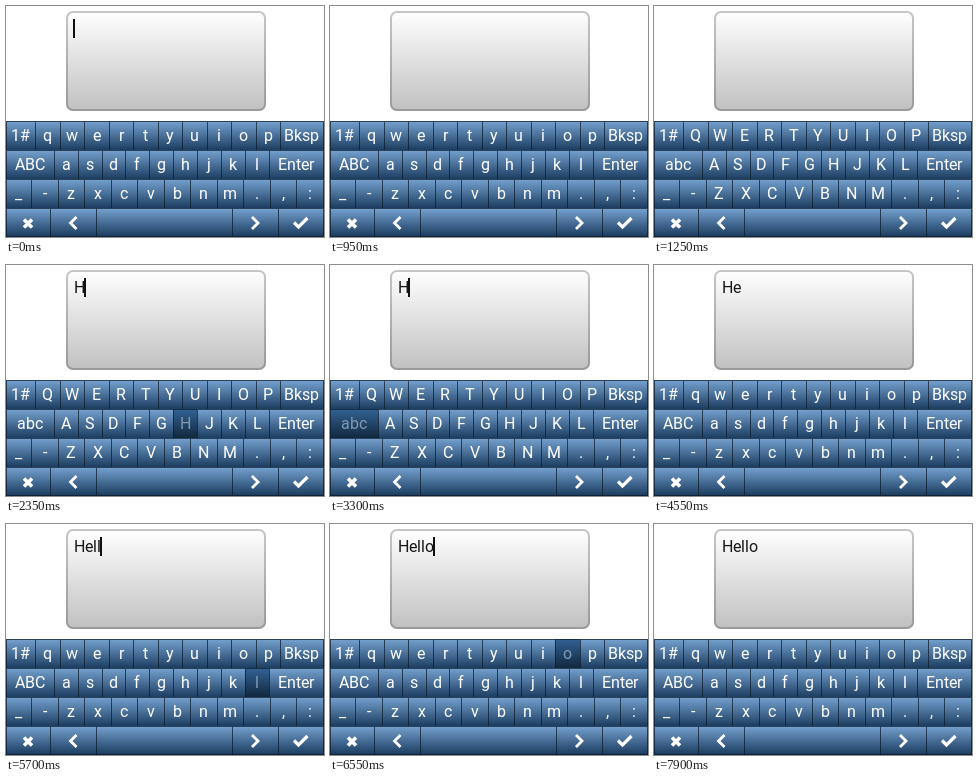
An HTML page that plays this animation: 318 px wide and 231 px high, repeating every 8000 ms.

```html
<!DOCTYPE html>
<html lang="en">
<head>
<meta charset="utf-8">
<title>On-screen keyboard</title>
<style>
  html, body { margin: 0; width: 100%; height: 100%; overflow: hidden; background: #fff; }
  #stage { position: relative; width: 318px; height: 231px; overflow: hidden; }
  #stage > * { position: absolute; }
  .field {
    left: 60px; top: 5px; width: 200px; height: 100px; border-radius: 7px;
    background: linear-gradient(#fff, #c0c0c0);
    box-shadow: inset 0 0 0 2px rgba(64, 64, 64, .3);
  }
  .key {
    background: linear-gradient(#76a2d0, #193a5d);
    box-shadow: inset 0 0 0 1px rgba(11, 25, 40, .7);
  }
  .key.down { background: linear-gradient(#336294, #10263c); }
  svg { left: 0; top: 0; }
  text { font: 16px Roboto, sans-serif; fill: #fff; white-space: pre; }
  text.down { fill: #8299b0; }
  #typed { fill: #181818; }
  #caret { fill: #101010; }
  .icon { fill: none; stroke: #fff; }
</style>
</head>
<body>
<div id="stage">
  <div class="field"></div>
  <svg id="ink" width="318" height="231">
    <text id="typed" y="28"></text>
    <rect id="caret" y="13" width="2" height="19"/>
    <path class="icon" stroke-width="3.6" d="M18 213.5l8 8m0-8l-8 8"/>
    <path class="icon" stroke-width="2.8" d="M70.5 211l-6 6l6 6"/>
    <path class="icon" stroke-width="2.8" d="M246 211l6 6l-6 6"/>
    <path class="icon" stroke-width="3.2" d="M288 216.5l4.5 4.5l9-9"/>
  </svg>
</div>
<script>
const LOOP = 8000, WIDTH = 318, TOP = 115, ROW = 29, TEXT_X = 68;

// labels, relative widths, sub-pixel shift of the dividers
const rows = [
  ["1# q w e r t y u i o p Bksp".split(" "), [5, 4, 4, 4, 4, 4, 4, 4, 4, 4, 4, 7], -.7],
  ["ABC a s d f g h j k l Enter".split(" "), [6, 3, 3, 3, 3, 3, 3, 3, 3, 3, 7], .65],
  ["_ - z x c v b n m . , :".split(" "), Array(12).fill(1), -.9],
  [["", "", "", "", ""], [2, 2, 6, 2, 2], -.5]
];

const caretFlips = [50, 500, 950, 1550, 1850, 2250, 2750, 3200, 3650, 4050,
  4550, 5000, 6100, 6550, 7050, 7450, 7900];
const presses = [
  [1150, 1250, "ABC"], [2350, 2450, "h"], [3300, 3350, "ABC"], [4150, 4250, "e"],
  [5350, 5450, "l"], [5700, 5800, "l"], [6550, 6650, "o"]
];

const stage = document.getElementById("stage");
const ink = document.getElementById("ink");
const typed = document.getElementById("typed");
const caret = document.getElementById("caret");
const pen = document.createElement("canvas").getContext("2d");
pen.font = "16px Roboto, sans-serif";

const advance = ch => Math.round(pen.measureText(ch).width);
const widthOf = str => [...str].reduce((sum, ch) => sum + advance(ch), 0);

// Glyphs sit on whole pixels
function setText(node, str, x) {
  node.textContent = str;
  node.setAttribute("x", [...str].map((_, i) => x + widthOf(str.slice(0, i))).join(" "));
}

const keys = [];
rows.forEach(([labels, units, shift], r) => {
  const total = units.reduce((a, b) => a + b);
  let sum = 0, left = 0;
  labels.forEach((label, i) => {
    sum += units[i];
    const last = i === labels.length - 1;
    const right = last ? WIDTH : Math.floor(sum * WIDTH / total + shift) + 1;
    const top = TOP + r * ROW;
    const box = document.createElement("div");
    box.className = "key";
    box.style.cssText = `left:${left}px;top:${top}px;width:${right - left}px;height:${ROW + (r < 3)}px`;
    stage.insertBefore(box, ink);
    const text = document.createElementNS("http://www.w3.org/2000/svg", "text");
    text.setAttribute("y", top + 20);
    ink.append(text);
    keys.push({ label, box, text, left, width: right - left });
    left = right - 1;
  });
});

function shown(label, upper) {
  if (!upper) return label;
  if (label === "ABC") return "abc";
  return label.length === 1 ? label.toUpperCase() : label;
}

function stateAt(t) {
  const held = presses.find(([from, to]) => t >= from && t < to);
  const word = presses.filter(([from, , k]) => t >= from && k !== "ABC").map(p => p[2]).join("");
  return {
    caret: caretFlips.filter(f => f <= t).length % 2 === 0,
    upper: t >= 1250 && t < 3350,
    held: held ? held[2] : null,
    word: word.charAt(0).toUpperCase() + word.slice(1)
  };
}

function render(s) {
  for (const k of keys) {
    const str = shown(k.label, s.upper);
    const down = k.label !== "" && k.label === s.held;
    setText(k.text, str, k.left + Math.floor((k.width - widthOf(str)) / 2));
    k.box.classList.toggle("down", down);
    k.text.classList.toggle("down", down);
  }
  setText(typed, s.word, TEXT_X);
  caret.setAttribute("x", TEXT_X - 1 + widthOf(s.word));
  caret.setAttribute("visibility", s.caret ? "visible" : "hidden");
}

const start = performance.now();
let current = "";
function tick() {
  const state = stateAt((performance.now() - start) % LOOP);
  const id = JSON.stringify(state);
  if (id !== current) {
    current = id;
    render(state);
  }
  requestAnimationFrame(tick);
}
tick();
</script>
</body>
</html>
```
